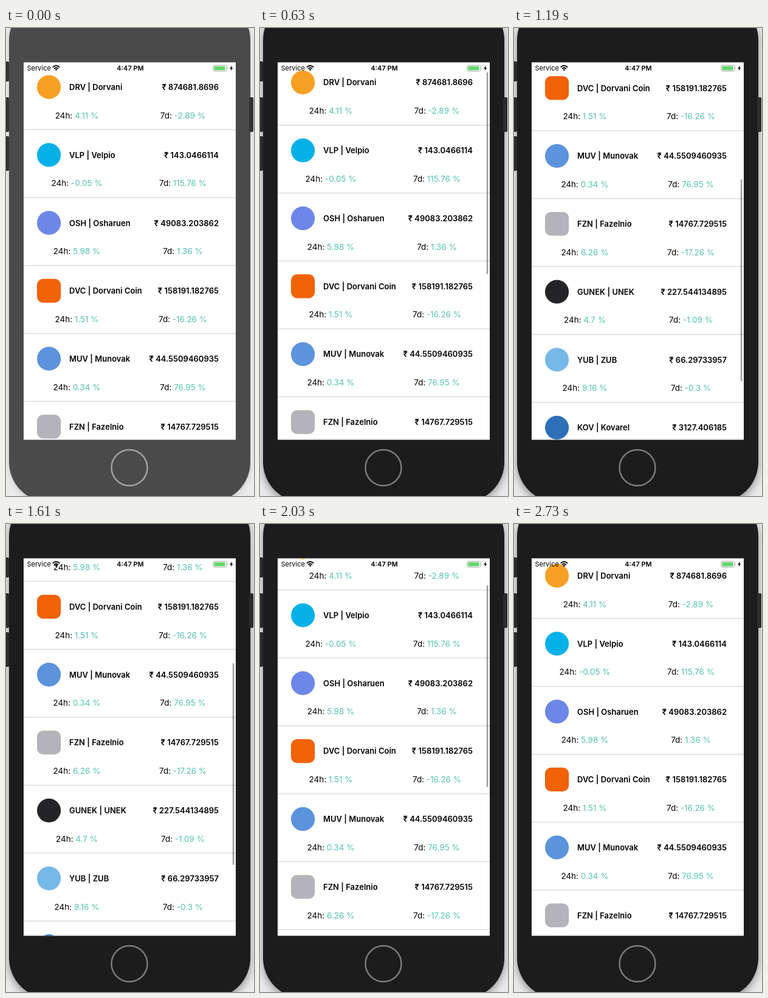
Animation, 408 px wide and 770 px high, one loop 2.8 s. Source, as an HTML page:

```html
<!DOCTYPE html>
<html lang="en">
<head>
<meta charset="utf-8">
<title>Price list</title>
<style>
  html, body { margin: 0; width: 100%; height: 100%; overflow: hidden; background: #ebebeb; }
  svg { display: block; font-family: Inter, Roboto, sans-serif; --body: #1c1c1c; --key: #2b2b2b; --ring: #7b7b7b; }
  svg.idle { --body: #4a4a4a; --key: #333; --ring: #a2a2a2; }
  .key { fill: var(--key); }
  .phone { fill: var(--body); filter: drop-shadow(0 5px 7px rgba(0, 0, 0, .4)); }
  .idle .phone { filter: drop-shadow(0 3px 5px rgba(0, 0, 0, .15)); }
  .title { font-size: 13px; font-weight: 600; }
  .change { font-size: 13.5px; text-anchor: middle; }
  .change tspan { fill: #55c2b2; }
  .price { text-anchor: end; }
  .status { font-size: 11px; }
</style>
</head>
<body>
<svg id="stage" width="408" height="770" viewBox="0 0 408 770">
  <defs><clipPath id="screen"><rect x="29" y="56.5" width="349" height="621"/></clipPath></defs>
  <rect width="408" height="770" fill="#ebebeb"/>
  <rect class="phone" x="5" y="-46" width="397" height="826" rx="66"/>
  <g class="key">
    <rect x="-4" y="55" width="9" height="33" rx="2"/>
    <rect x="-4" y="114" width="9" height="57" rx="2"/>
    <rect x="-4" y="178" width="9" height="57" rx="2"/>
    <rect x="400" y="114" width="7" height="57" rx="2"/>
  </g>
  <circle cx="203" cy="723.5" r="29.5" fill="none" stroke="var(--ring)" stroke-width="2.5"/>
  <g clip-path="url(#screen)">
    <rect x="29" y="56" width="349" height="622" fill="#fff"/>
    <g id="list"></g>
    <rect id="bar" x="372.8" width="2.6" height="332" rx="1.3" fill="#000" fill-opacity=".38"/>
    <g class="status">
      <text x="34.5" y="70">Service</text>
      <g fill="none" stroke="#000" stroke-width="1.9">
        <path d="M76.8 64.6Q82.5 59.4 88.2 64.6M79 67.1Q82.5 63.9 86 67.1"/>
        <path d="M80.6 68.4Q82.5 66.7 84.4 68.4L82.5 70.6Z" fill="#000" stroke="none"/>
      </g>
      <text x="204.5" y="70" text-anchor="middle" font-weight="600">4:47 PM</text>
      <rect x="341" y="61.4" width="22" height="9.6" rx="2.4" fill="none" stroke="#999" stroke-width=".9"/>
      <rect x="342.5" y="62.9" width="18" height="6.6" rx="1.2" fill="#62d86b"/>
      <path d="M364.2 64.7Q366 66.2 364.2 67.7Z" fill="#999"/>
      <path d="M372 61.5L368 66.8H370.4L369.4 70.8L373.4 65.4H371Z"/>
    </g>
  </g>
</svg>
<script>
const LOOP = 2800, STEP = 70, ROW_HEIGHT = 111.75;
const stage = document.getElementById('stage');
const list = document.getElementById('list');
const bar = document.getElementById('bar');

// name, price, 24h change, 7d change, icon colour, corner radius
const rows = [
  ['DRV | Dorvani', '874681.8696', '4.11', '-2.89', '#f8a024', 20],
  ['VLP | Velpio', '143.0466114', '-0.05', '115.76', '#06b1e8', 20],
  ['OSH | Osharuen', '49083.203862', '5.98', '1.36', '#6c87e8', 20],
  ['DVC | Dorvani Coin', '158191.182765', '1.51', '-16.26', '#f26207', 10],
  ['MUV | Munovak', '44.5509460935', '0.34', '76.95', '#5b93dc', 20],
  ['FZN | Fazelnio', '14767.729515', '6.26', '-17.26', '#b4b3b9', 10],
  ['GUNEK | UNEK', '227.544134895', '4.7', '-1.09', '#242426', 20],
  ['YUB | ZUB', '66.29733957', '9.16', '-0.3', '#76b8e8', 20],
  ['KOV | Kovarel', '3127.406185', '2.35', '-4.18', '#2c70b8', 20]
];

const change = (x, label, value) =>
  `<text class="change" x="${x}" y="148.7">${label}: <tspan>${value} %</tspan></text>`;

list.innerHTML = rows.map(([name, price, day, week, color, radius], i) => `
  <g transform="translate(0 ${i * ROW_HEIGHT})">
    <rect x="51" y="77.6" width="39.2" height="39.2" rx="${radius}" fill="${color}"/>
    <text class="title" x="104" y="102">${name}</text>
    <text class="title price" x="350" y="102">₹ ${price}</text>
    ${change(116.5, '24h', day)}
    ${change(291, '7d', week)}
    <rect x="29" y="166.6" width="349" height="1.5" fill="#ddd"/>
  </g>`).join('');

const progress = (t, start, end) => Math.min(1, Math.max(0, (t - start) / (end - start)));
const ease = u => u * u * u * (10 - 15 * u + 6 * u * u);

function draw(now) {
  const t = Math.floor((now % LOOP) / STEP) * STEP;
  const scroll = 2.2 * progress(t, 0, 560)
    + 331.5 * ease(progress(t, 560, 1120))
    - 321.7 * ease(progress(t, 1367, 2296));
  stage.classList.toggle('idle', t < STEP);
  list.setAttribute('transform', `translate(0 ${-scroll})`);
  bar.setAttribute('y', 69 + 0.54 * scroll);
  bar.setAttribute('opacity', progress(t, 0, 210) * (1 - 0.95 * progress(t, 2520, 2730)));
  requestAnimationFrame(draw);
}
requestAnimationFrame(draw);
</script>
</body>
</html>
```
